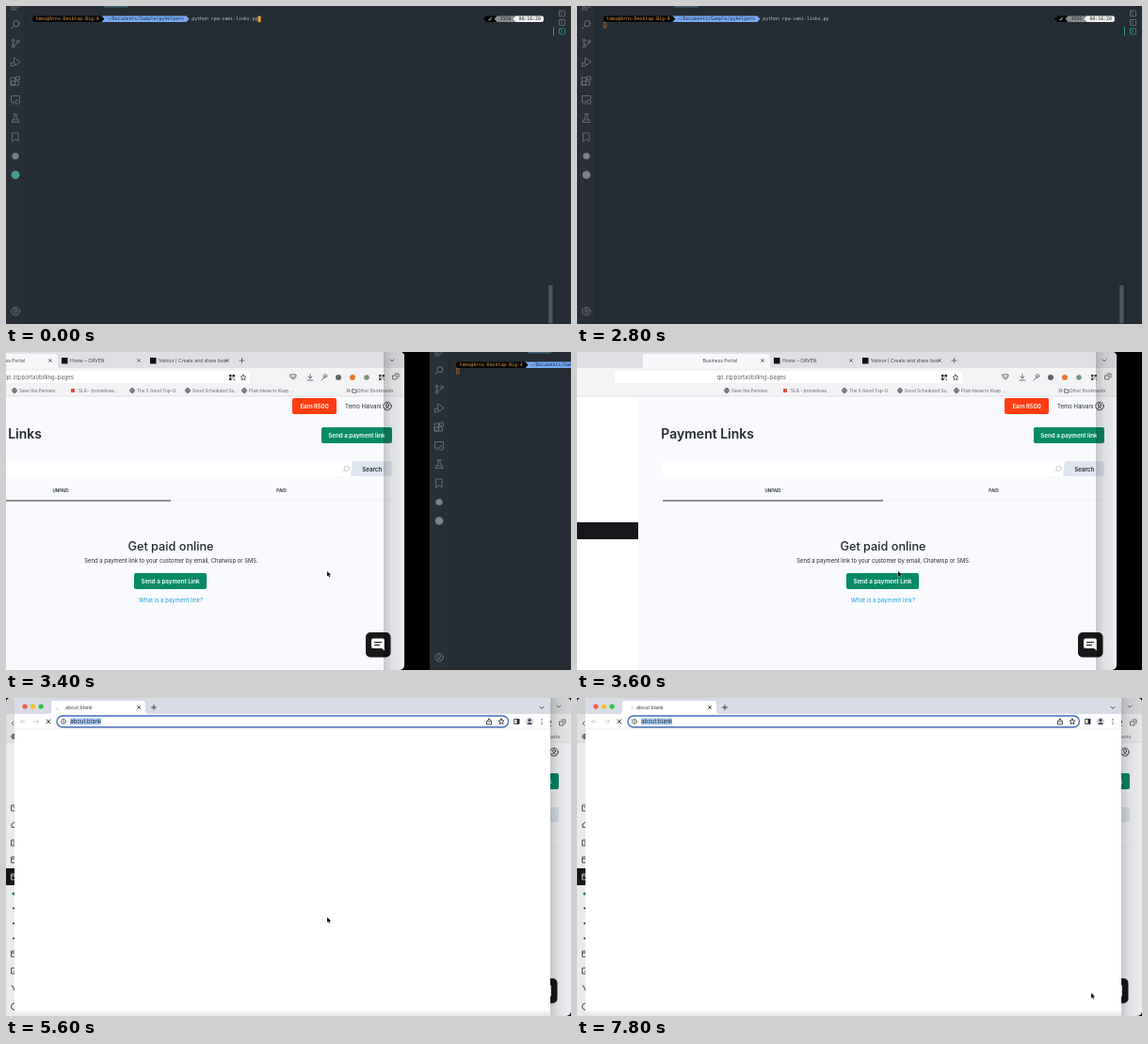
These frames come from a looping animation (600 px wide and 338 px high, 8000 ms). An HTML page:

```html
<!DOCTYPE html>
<html lang="en">
<head>
<meta charset="utf-8">
<title>Terminal to browser</title>
<style>
html, body { margin: 0; width: 100%; height: 100%; overflow: hidden; background: #000; }
svg { display: block; width: 100%; height: 100%; }
text { font-family: Inter, sans-serif; font-size: 6px; fill: #24282e; white-space: pre; }
.mono text { font: 4.87px "DejaVu Sans Mono", monospace; }
.mid { text-anchor: middle; }
.end { text-anchor: end; }
.bold { font-weight: 600; }
.white { fill: #fff; }
.tab { font-size: 5px; fill: #3c4046; }
.mark { font-size: 4.7px; fill: #62666c; }
.line { fill: none; stroke: #737a81; stroke-width: .8; stroke-linecap: round; stroke-linejoin: round; }
.line.dark { stroke: #4a4e54; }
.line.black { stroke: #202328; }
.line.pale { stroke: #c0c3c7; }

/* Every change is a hard step on a 200 ms grid, 2.5% each. */
.world, .typed, .entered, .focus, .blur, .chrome, .idle, .busy, .arc, .spin, .pointer {
  animation: 8s step-end -40ms infinite;
}
.world { animation-name: swipe; }
.typed { animation-name: typed; }
.entered { animation-name: entered; }
.focus { animation-name: focus; }
.blur { animation-name: blur; }
.chrome { animation-name: open; }
.idle { animation-name: idle; }
.busy { animation-name: busy; }
.arc { animation-name: arc; }
.pointer { animation-name: move; }
.spin { animation: spin 1.6s steps(8) -40ms infinite; transform-origin: 56px 10px; }

@keyframes swipe {
  0% { transform: translateX(-450px); }
  40% { transform: translateX(-397.5px); }
  42.5% { transform: none; }
  45% { transform: translateX(150px); }
  47.5% { transform: translateX(174px); }
  50%, 100% { transform: translateX(177px); }
}
@keyframes typed { 0% { visibility: visible; } 12.5%, 100% { visibility: hidden; } }
@keyframes entered { 0% { visibility: hidden; } 12.5%, 100% { visibility: visible; } }
@keyframes focus { 0% { visibility: hidden; } 12.5% { visibility: visible; } 35%, 100% { visibility: hidden; } }
@keyframes blur { 0% { visibility: hidden; } 35%, 100% { visibility: visible; } }
@keyframes open { 0% { visibility: hidden; } 47.5%, 100% { visibility: visible; } }
@keyframes idle { 0% { opacity: 1; } 62.5%, 100% { opacity: 0; } }
@keyframes busy { 0% { opacity: 0; } 62.5%, 100% { opacity: 1; } }
@keyframes arc { 0% { opacity: 0; } 62.5% { opacity: 1; } 80% { opacity: 0; } 87.5%, 100% { opacity: 1; } }
@keyframes spin { to { transform: rotate(-360deg); } }
@keyframes move {
  0% { visibility: hidden; transform: translate(341px, 233px); }
  37.5% { visibility: visible; transform: translate(341px, 233px); }
  72.5% { visibility: visible; transform: translate(410px, 260px); }
  75% { visibility: visible; transform: translate(505px, 297px); }
  77.5% { visibility: visible; transform: translate(538px, 311px); }
  80%, 100% { visibility: visible; transform: translate(546px, 313.5px); }
}
</style>
</head>
<body>
<svg viewBox="0 0 600 338" preserveAspectRatio="none">
  <defs>
    <linearGradient id="shade">
      <stop stop-opacity=".2"/><stop offset=".4" stop-opacity=".1"/><stop offset="1" stop-opacity=".05"/>
    </linearGradient>
    <linearGradient id="foot" x2="0" y2="1">
      <stop stop-color="#fff"/><stop offset="1" stop-color="#e3e3e4"/>
    </linearGradient>
    <path id="cross" d="M-1.5-1.5l3 3m0-3l-3 3"/>
    <g id="user"><circle r="4.3"/><circle cy="-1.1" r="1.6"/><path d="M-2.8 3.1q2.8-3.6 5.6 0"/></g>
    <g id="shell"><rect x="-3" y="-3" width="6" height="6" rx=".6"/><path d="M-1.4-1.5l1.6 1.5-1.6 1.5"/></g>
    <g id="lens"><circle cx=".7" cy="-.7" r="2.6"/><path d="M-1.3 1.3l-2.2 2.2"/></g>
    <path id="star" d="M0-3l.9 2 2.1.2-1.6 1.4.5 2.2L0 1.7l-1.9 1.1.5-2.2L-3-.8l2.1-.2z"/>
    <path id="globe" d="M-2.4 0a2.4 2.4 0 1 0 4.8 0a2.4 2.4 0 1 0-4.8 0h4.8M0-2.4q-2 2.4 0 4.8q2-2.4 0-4.8"/>
    <path id="grid" d="M-3-3h2.5v2.5H-3zM.5-3H3v2.5H.5zM-3 .5h2.5V3H-3zM.5.5h1v1h-1zM2 2h1v1H2z"/>
  </defs>

  <g class="world">
    <g id="browser">
      <rect x="-177" width="600" height="338" rx="5" fill="#f8fafd"/>
      <path d="M-177 17V5q0-5 5-5h590q5 0 5 5v12z" fill="#dfe0e4"/>
      <path d="M-80 17V4q0-2 2-2H53q2 0 2 2v13z" fill="#f7f7f9"/>
      <path d="M-177 17h600v30h-600z" fill="#f3f3f6"/>
      <rect x="-110" y="20" width="369" height="13" rx="2" fill="#fff"/>
      <path d="M-177 47h600" stroke="#d5d7db" stroke-width=".7"/>
      <g class="line dark" stroke-width=".7">
        <use href="#cross" x="47" y="9"/><use href="#cross" x="141" y="9"/><use href="#cross" x="235" y="9"/>
        <path d="M248 9h5m-2.5-2.5v5M408 8l2 2 2-2M-169 25l-2 2 2 2"/>
        <use href="#star" x="252" y="27"/>
        <path d="M302 24h6v2q-3 6-6 0zM303.500 26l1.500 1.500 1.500-1.500M323 23.500v4.500m-2-2l2 2 2-2M320 30h6M335 30l4-4"/>
        <circle cx="339" cy="25.500" r="1.700"/>
        <path d="M411 25h4v4h-4zm2-2h4v4"/>
        <use href="#globe" x="9" y="41"/><use href="#globe" x="134" y="41"/>
        <use href="#globe" x="193" y="41"/><use href="#globe" x="253" y="41"/><use href="#globe" x="-169" y="41"/>
        <path d="M362 39.500l1.300 1.500-1.300 1.500m2-3l1.300 1.500-1.300 1.500M368 39.500h1.500l.6.700h2v3H368z"/>
      </g>
      <use href="#grid" x="240" y="27" fill="#222"/>
      <use href="#grid" x="399" y="27" fill="#444"/>
      <circle cx="353" cy="27" r="3" fill="#5f6267"/>
      <circle cx="368" cy="27" r="3" fill="#e8792e"/>
      <circle cx="383" cy="27" r="2.800" fill="#71957a"/>
      <path d="M59 6h6.500v6.500H59zM153 6h6.500v6.500H153z" fill="#111"/>
      <path d="M69 39h4v4h-4z" fill="#df5146"/>
      <text class="tab end" x="20" y="11">Business Portal</text>
      <text class="tab" x="68" y="11">Home – ORVEN</text>
      <text class="tab" x="162" y="11">Velmor | Create and share bea</text>
      <text class="end" x="72" y="29" fill-opacity=".75">qo.zq/portal/billing-pages</text>
      <text class="mark" x="14" y="42.700">Save the Pennies ...</text>
      <text class="mark" x="77" y="42.700">SLA - brontelivas...</text>
      <text class="mark" x="139" y="42.700">The 5 Good Top-U...</text>
      <text class="mark" x="198" y="42.700">Good Scheduled Sa...</text>
      <text class="mark" x="258" y="42.700">Plain Ideas to Keep ...</text>
      <text class="mark" x="373" y="42.700">Other Bookmarks</text>

      <path d="M-177 48h92v290h-92z" fill="#fff"/>
      <path d="M-177 181h92v18h-92z" fill="#15171a"/>
      <g class="line black">
        <path d="M-171 114h6v6h-6zm2 2h4M-171 137v-3l3-2 3 2v3zM-171 151h6v6h-6zm2 2h4m-4 2h4M-171 169h6v6h-6zm0 2h6M-171 269h6v6h-6zm0 2h6M-171 287h6v6h-6zm2 4l4-3M-171 306h1l2 5h4"/>
        <circle cx="-168" cy="328" r="3.500"/>
        <path d="M-171 187h6v6h-6zm0 2h6" stroke="#fff"/>
      </g>
      <g fill="#202328">
        <circle cx="-169" cy="223.500" r="1"/><circle cx="-169" cy="239.500" r="1"/><circle cx="-169" cy="255.500" r="1"/>
      </g>
      <circle class="idle" cx="-169" cy="208" r="1.500" fill="#2779b5"/>
      <circle class="busy" cx="-169" cy="208" r="1.500" fill="#16885f"/>

      <rect x="304" y="49" width="47" height="17" rx="2" fill="#ff3d12"/>
      <text class="mid bold white" x="327.500" y="60">Earn R500</text>
      <text x="360" y="59.700" font-size="5.600">Temo Halvani</text>
      <use class="line black" href="#user" x="405" y="57.500"/>
      <text class="end bold" x="38" y="91.500" style="font-size:14px">Payment Links</text>
      <rect x="335" y="80" width="75" height="17" rx="2" fill="#078a67"/>
      <text class="mid bold white" x="372.500" y="90.800" style="font-size:6.200px">Send a payment link</text>
      <path d="M-59 116h427v16H-59z" fill="#fff"/>
      <path d="M368 116h40q2 0 2 2v12q0 2-2 2h-42z" fill="#dfe5ef"/>
      <use class="line pale" href="#lens" x="361" y="124.500"/>
      <text class="mid bold" x="388.700" y="126.500" style="font-size:6.200px">Search</text>
      <text class="mid bold" x="58" y="149.300" style="font-size:4.500px">UNPAID</text>
      <text class="mid bold" x="292.500" y="149.300" style="font-size:4.500px">PAID</text>
      <path d="M175 158h235" stroke="#e7eaf0" stroke-width=".7"/>
      <path d="M-59 158h234" stroke="#25292e"/>
      <text class="mid" x="175" y="210.500" style="font-size:12.700px;font-weight:500">Get paid online</text>
      <text class="mid" x="175.500" y="223.800" style="font-size:5.950px">Send a payment link to your customer by email, Chatwisp or SMS.</text>
      <rect x="136" y="235" width="77" height="17" rx="2" fill="#078a67"/>
      <text class="mid bold white" x="174.500" y="245.700" style="font-size:6.200px">Send a payment Link</text>
      <text class="mid" x="175" y="266" style="font-size:6.100px;fill:#18a0dc">What is a payment link?</text>
      <rect x="382" y="298" width="26.500" height="26.500" rx="5" fill="#16181a"/>
      <path d="M390 304.500h10q2 0 2 2v11l-3-2.500h-9q-2 0-2-2v-6.500q0-2 2-2z" fill="#fff"/>
      <path d="M391 308.500h8m-8 3h6" stroke="#16181a"/>
      <path d="M401 0h17q5 0 5 5v333h-22z" fill="url(#shade)"/>
      <path d="M-177 0h9v338h-9z" fill-opacity=".08"/>
    </g>

    <g class="chrome" transform-origin="0 0">
      <g transform="translate(-177)">
        <path d="M9 338V5q0-5 5-5h559q5 0 5 5v333z" fill="#fff"/>
        <path d="M9 17V5q0-5 5-5h559q5 0 5 5v12z" fill="#d8dce5"/>
        <path d="M45 17q3 0 3-3V6q0-3 3-3h94q3 0 3 3v8q0 3 3 3z" fill="#fff"/>
        <circle cx="20" cy="9" r="2.600" fill="#f4564d"/>
        <circle cx="28.600" cy="9" r="2.600" fill="#f5bd2e"/>
        <circle cx="37.200" cy="9" r="2.600" fill="#2fc140"/>
        <path d="M9 33h569" stroke="#e2e4e7" stroke-width=".7"/>
        <rect x="54" y="19" width="479.500" height="12" rx="6" fill="#fff" stroke="#426bb8" stroke-width="1.300"/>
        <path d="M68 21.500h33v7H68z" fill="#a6cdfa"/>
        <text class="tab" x="63" y="11.900" style="font-size:5.200px">about:blank</text>
        <text x="68.200" y="27.200" style="font-size:6px">about:blank</text>
        <g class="line pale"><path d="M20.500 25h-5m2-2l-2 2 2 2M29.500 25h5m-2-2l2 2-2 2"/></g>
        <g class="line black">
          <use href="#cross" x="141" y="10"/>
          <path d="M154.500 10h5m-2.500-2.500v5M567 9.300l2 2 2-2"/>
          <circle cx="61" cy="25" r="2.500" stroke-width=".6"/><path d="M61 24.800v1.200m0-2.400v.1"/>
          <path d="M511.500 24.500h-1v3.500h5v-3.500h-1M513 26v-4m-1.300 1.300l1.300-1.300 1.300 1.300M540 22.500h5v5h-5z"/>
          <use href="#star" x="526" y="25"/>
        </g>
        <path d="M542.500 22.500h2.500v5h-2.500z" fill="#202328"/>
        <circle cx="556" cy="25" r="4.200" fill="#d3d8e1"/>
        <circle cx="556" cy="23.500" r="1.600" fill="#303744"/><path d="M553 28q3-4.200 6 0z" fill="#303744"/>
        <path d="M569 22.700v.1m0 2.200v.1m0 2.200v.1" stroke="#333" stroke-width="1.200" stroke-linecap="round"/>
        <g class="idle">
          <circle cx="56" cy="10" r="3" fill="#51565d"/>
          <path d="M54 8.500l2 .5-.5 1.500-2 .3m3.500-2.500l1.500 1.500M56 12.500l1-1.500 1.500.3" fill="none" stroke="#fff" stroke-width=".8"/>
          <path class="line black" d="M47.200 26a2.500 2.500 0 1 1-.3-2.500m.3-1.500v1.800h-1.800"/>
        </g>
        <g class="busy"><path class="line black" d="M43 23l4 4m0-4l-4 4"/></g>
        <g class="arc"><path class="spin line pale" d="M56 7a3 3 0 0 1 3 3"/></g>
        <path d="M9 331h569v7H9z" fill="url(#foot)"/>
      </g>
    </g>

    <g id="editor" transform="translate(450)">
      <path d="M0 0h600v338H0z" fill="#262c33"/>
      <path d="M0 0h20v338H0z" fill="#292f36"/>
      <path d="M20.300 0v338M582.500 0v338M0 337.700h600" stroke="#20252b" stroke-width=".6"/>
      <path d="M104 .8h25" stroke="#4a7f96"/>
      <path d="M576.300 297h4.200v40.500h-4.200z" fill="#50565d"/>
      <path d="M581.500 22.500v9" stroke="#2ca18b"/>
      <g class="line">
        <path d="M6 0v4h4.500M8 0v2h4l2-2"/>
        <use href="#lens" x="10" y="19.500" transform-origin="10 19.500" transform="scale(1.200)"/>
        <circle cx="7.500" cy="36.500" r="1.400"/><circle cx="7.500" cy="43" r="1.400"/><circle cx="12.700" cy="37.500" r="1.400"/>
        <path d="M7.500 38v3.500m5.200-2.600q0 2-5 2.300"/>
        <path d="M8.500 60v-5l6.500 4.500-5 3.500"/><circle cx="7.500" cy="62" r="2"/><path d="M4.700 60.500l1 .5m-1 3l1-.5"/>
        <path d="M5.500 76h4v8h-4zm0 4h8v4h-8zM11 75h3.500v3.500H11z"/>
        <path d="M14.500 99v-3.500h-9v6.500H9m-2 2h2"/><circle cx="12.500" cy="102" r="2.200"/>
        <path d="M8 115h4m-3 0v3l-3 5.500h8L11 118v-3m-4 6h6"/>
        <path d="M7 135h6v9l-3-2.500-3 2.500z"/>
        <use href="#user" x="10" y="324.500"/>
        <use href="#shell" x="590.500" y="8"/><use href="#shell" x="590.500" y="17.500"/>
        <use href="#shell" x="590.500" y="27" stroke="#2ca18b"/>
      </g>
      <circle cx="10" cy="159.500" r="3.600" fill="#7a8188"/>
      <circle cx="10" cy="179.500" r="4.300" fill="#7a8188"/>
      <circle class="typed" cx="10" cy="179.500" r="4.300" fill="#459b96"/>

      <g class="mono">
        <path d="M101 10.500h90.500l3 3.300-3 3.300H101z" fill="#76aaf2"/>
        <path d="M30 10.500h71.500l3 3.300-3 3.300H30q-2 0-2-3.300t2-3.300z" fill="#050505"/>
        <text x="31.500" y="15.400" style="fill:#ef9b45">temo@Arns-Desktop-Big-4</text>
        <text x="107" y="15.400" style="fill:#14233b">~/Documents/Sample/pyhelpers</text>
        <text x="197.300" y="15.400" style="fill:#c7ccd2">python rpa-vemi-links.py</text>
        <path d="M507 13.800l3-3.300h12v6.600h-12z" fill="#050505"/>
        <path d="M518.500 13.800l3-3.300H543v6.600h-21.500z" fill="#8b8e91"/>
        <path d="M538.500 13.800l3-3.300h27.500q2 0 2 3.300t-2 3.300h-27.500z" fill="#f4f4f4"/>
        <path d="M512.500 14l1 1.200 2-3" fill="none" stroke="#fff" stroke-width=".8"/>
        <text x="524.500" y="15.400" style="fill:#25282c">3550</text>
        <text x="544.500" y="15.400" style="fill:#111">00:16:20</text>
      </g>
      <path class="typed" d="M267.500 10.700h3v6.400h-3z" fill="#f0a640"/>
      <path class="focus" d="M28.300 17.300h3v6h-3z" fill="#f0a640"/>
      <path class="blur" d="M28.600 17.600h2.400v5.500h-2.400z" fill="none" stroke="#b8743c" stroke-width=".7"/>
    </g>
  </g>

  <path class="pointer" d="M0 0v5.500l1.300-1.100 1 2.200 1-.5-1-2.100h1.800z" fill="#111" stroke="#fff" stroke-width=".6" paint-order="stroke"/>
</svg>
</body>
</html>
```
